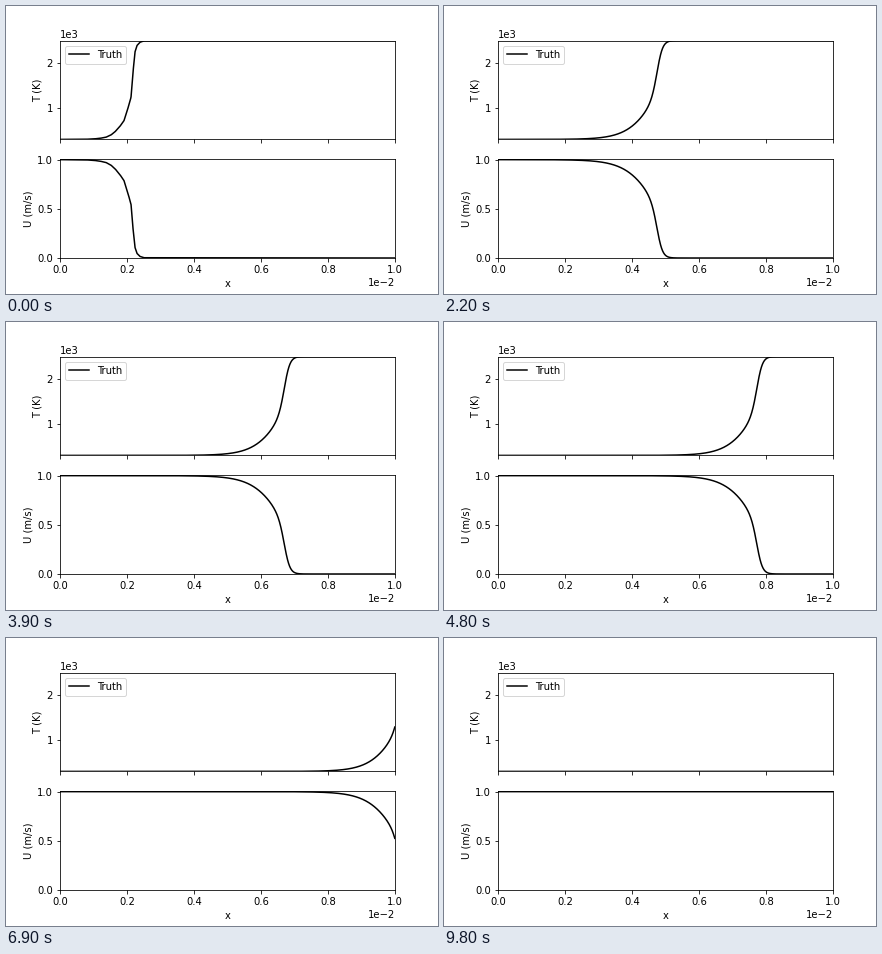
Animation, 432 px wide and 288 px high, one loop 10 s. Source, as a matplotlib script:

```python
import numpy as np
import matplotlib.pyplot as plt
from matplotlib.animation import FuncAnimation

FRAMES, INTERVAL = 100, 100
LENGTH = 0.01               # domain length
SPAN = 334.8                # domain length in front units
SPEED = 3.84                # front travel per frame, same units
T_COLD, T_HOT = 300.0, 2500.0

x = np.linspace(0, LENGTH, 1000)
z = x / LENGTH * SPAN

# coarse starting profile: position and progress at its nodes
START_Z = [0, 25, 34, 40, 46, 51, 55, 60, 64, 67.5, 71, 73, 75, 77, 80, 84, SPAN]
START_C = [0, .001, .005, .011, .022, .045, .077, .133, .19, .30, .425,
           .68, .885, .95, .983, .997, 1]


def softplus(v):
    return np.logaddexp(0, v)


def flame(s):
    """Progress variable across a steady flame: slow preheat, sharp burnout."""
    logit = -0.205 + 0.068 * s + 0.9 * (softplus((s - 3) / 3) - softplus(-1))
    return 1 / (1 + np.exp(-np.clip(logit, -60, 60)))


def progress(n):
    if n == 0:
        return np.interp(z, START_Z, START_C)
    settle = np.exp(-n / 3)
    front = SPAN + SPEED * (n - 69) + 1.8 * settle
    return flame((z - front) * (1 + 0.6 * settle))


plt.rcParams.update({"font.family": "DejaVu Sans", "font.size": 10})
fig, (ax_t, ax_u) = plt.subplots(2, 1, sharex=True, figsize=(6, 4), dpi=72)
fig.subplots_adjust(left=0.125, right=0.9, bottom=0.125, top=0.88, hspace=0.2)

line_t, = ax_t.plot([], [], "k", lw=1.5, label="Truth")
line_u, = ax_u.plot([], [], "k", lw=1.5)

ax_t.set(ylabel="T (K)", ylim=(T_COLD, T_HOT), yticks=[1000, 2000])
ax_u.set(ylabel="U (m/s)", ylim=(0, 1.005), yticks=[0, 0.5, 1])
ax_u.set(xlabel="x", xlim=(0, LENGTH), xticks=np.linspace(0, LENGTH, 6))
for ax in (ax_t, ax_u):
    ax.ticklabel_format(style="sci", axis="both", scilimits=(0, 0))
ax_t.legend(loc="upper left")


def draw(n):
    c = progress(min(n, FRAMES - 2))
    line_t.set_data(x, T_COLD + (T_HOT - T_COLD) * c)
    line_u.set_data(x, 1 - c ** 0.93)
    return line_t, line_u


anim = FuncAnimation(fig, draw, frames=FRAMES, interval=INTERVAL,
                     init_func=lambda: draw(0), repeat=True, repeat_delay=0)
plt.show()
```
